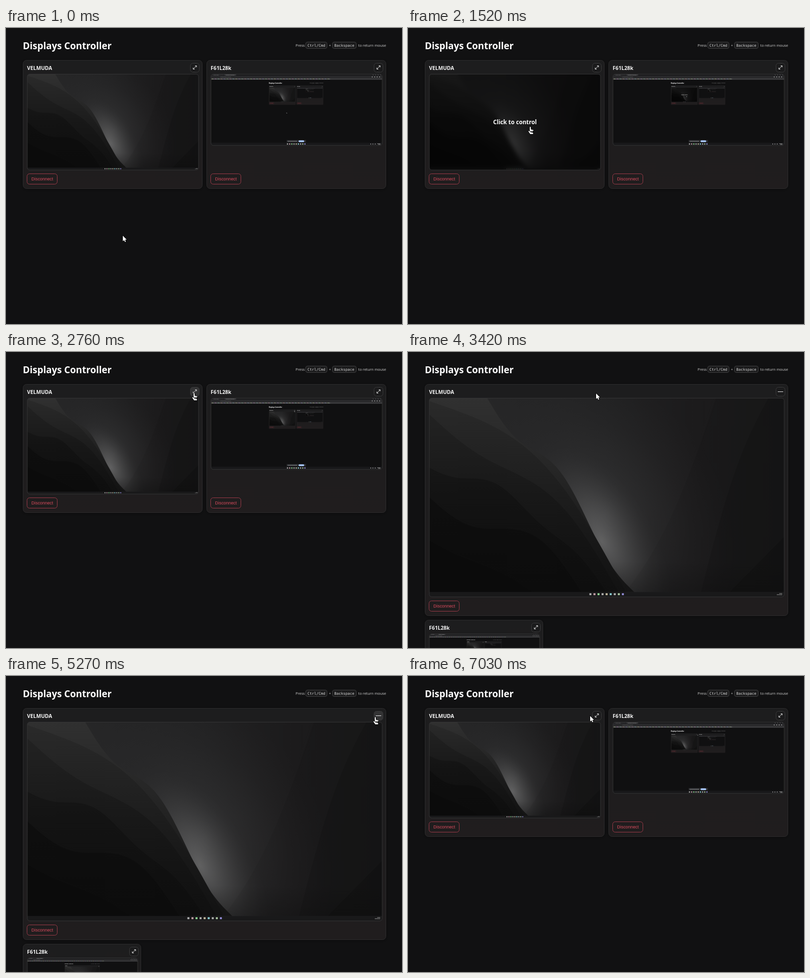
Write an HTML page with a canvas that moves like this. It is 800 px wide and 600 px high and loops after 7.06 s.

```html
<!DOCTYPE html>
<html lang="en">
<head>
<meta charset="utf-8">
<title>Displays Controller</title>
<style>
html, body { margin: 0; width: 100%; height: 100%; overflow: hidden; background: #111; }
canvas { display: block; width: 800px; height: 600px; }
</style>
</head>
<body>
<canvas id="stage" width="800" height="600"></canvas>
<script>
const LOOP = 7060, EXPAND = 3300, COLLAPSE = 5650, LAG = 150;
const SANS = '"Open Sans", "Noto Sans", sans-serif';
const MONO = '"DejaVu Sans Mono", monospace';
const BUTTON = '"Liberation Sans", Arial, sans-serif';
const stage = document.getElementById('stage').getContext('2d');
let c = stage;

const clamp = v => Math.max(0, Math.min(1, v));
const ramp = (t, a, b) => clamp((t - a) / (b - a));
const ease = u => u * u * (3 - 2 * u);
const gray = (v, a = 1) => `rgba(${v},${v},${v},${a})`;

function pointer(t) {
  const p = { x: 272, y: 431 };
  const move = (from, to, x, y) => {
    const u = ease(ramp(t, from, to));
    p.x += (x - p.x) * u;
    p.y += (y - p.y) * u;
  };
  move(-150, 0, 236, 421);
  move(700, 1450, 247, 201);
  move(1700, 2600, 380, 84);
  move(3930, 4900, 746, 84);
  move(6100, 7030, 368, 81);
  return p;
}

function rect(x, y, w, h, fill) {
  c.fillStyle = fill;
  c.fillRect(x, y, w, h);
}

function box(x, y, w, h, r, fill, line) {
  c.beginPath();
  c.roundRect(x + .5, y + .5, w - 1, h - 1, r);
  if (fill) { c.fillStyle = fill; c.fill(); }
  if (line) { c.strokeStyle = line; c.lineWidth = 1; c.stroke(); }
}

function text(s, x, y, font, color, align = 'left') {
  c.font = font;
  c.fillStyle = color;
  c.textAlign = align;
  c.fillText(s, x, y);
}

function gradient(x0, y0, x1, y1, ...colors) {
  const g = c.createLinearGradient(x0, y0, x1, y1);
  colors.forEach((k, i) => g.addColorStop(i / (colors.length - 1), k));
  return g;
}

// a line bent by one arch and one wave, filled down to the left or right side
function ridge(x0, y0, x1, y1, arch, wave, n, side, fill) {
  c.beginPath();
  for (let u = 0; u <= 1.001; u += .02) {
    const a = Math.PI * u;
    c.lineTo(x0 + (x1 - x0) * u, y0 + (y1 - y0) * u + arch * Math.sin(a) + wave * Math.sin(n * a));
  }
  c.lineTo(side, 487);
  c.lineTo(side, y0);
  c.fillStyle = fill;
  c.fill();
}

function glow(x, y, angle, rx, ry, strength) {
  c.save();
  c.translate(x, y);
  c.rotate(angle);
  c.scale(rx, ry);
  const g = c.createRadialGradient(0, 0, 0, 0, 0, 1);
  for (let r = 0; r <= 1; r += .125) g.addColorStop(r, gray(165, strength * (1 - r) ** 1.7));
  c.fillStyle = g;
  c.fillRect(-1, -1, 2, 2);
  c.restore();
}

function icons(x, y, step, size) {
  for (let i = 0; i < 9; i++) rect(x + i * step, y, size, size, `hsl(${205 + i * 140},${i % 3 * 22}%,68%)`);
}

// desktop picture, 717 by 403
function wallpaper() {
  c.save();
  c.translate(-43, -94);
  rect(43, 94, 717, 403, gradient(43, 0, 760, 0, '#2a2a2a', '#252526', '#212122', '#1c1b1c', '#181819'));
  glow(400, 330, 1, 330, 250, .15);
  glow(392, 385, 1.05, 215, 105, .42);
  ridge(622, 94, 440, 487, 45, 0, 1, 760, gray(0, .06));
  ridge(728, 94, 592, 487, -45, 0, 1, 760, gray(0, .12));
  ridge(760, 375, 650, 487, 0, 0, 1, 760, gray(0, .16));
  rect(43, 425, 717, 62, gradient(0, 425, 0, 487, gray(10, 0), gray(10, .25)));

  const tone = i => gradient(0, 94, 0, 487, gray(48 - 6 * i), gray(34 - 5 * i), gray(20 - 2 * i));
  ridge(160, 94, 457, 487, -26, 20, 3, 43, tone(0));
  ridge(43, 100, 440, 487, -96, 8, 2, 43, tone(1));
  ridge(43, 127, 425, 487, -52, 25, 2, 43, tone(2));
  ridge(43, 235, 400, 487, -58, 9, 4, 43, tone(3));
  ridge(43, 295, 350, 487, -32, 30, 2, 43, tone(4));
  ridge(43, 383, 250, 487, -4, 4, 2, 43, gray(11));

  rect(43, 487, 717, 10, '#19191a');
  icons(366.5, 489.5, 8.2, 4);
  rect(750, 489.5, 6, 1, '#888');
  rect(745, 492, 11, 1, '#999');
  c.restore();
}

const soft = document.createElement('canvas');
soft.width = 717;
soft.height = 403;
c = soft.getContext('2d');
wallpaper();
c = stage;

function desktop(w, h, veil) {
  c.save();
  c.scale(w / 717, h / 403);
  wallpaper();
  c.restore();
  if (!veil) return;
  c.save();
  c.globalAlpha = veil;
  c.filter = `blur(${4 * c.getTransform().a}px)`;
  c.drawImage(soft, 0, 0, w, h);
  c.filter = 'none';
  rect(0, 0, w, h, gray(0, .5));
  text('Click to control', w / 2, h / 2 + 4, `700 11.7px ${SANS}`, '#fff', 'center');
  c.restore();
}

// wide monitor with a browser showing this page, 346 by 144.5
function mirror(w, t, depth) {
  c.save();
  c.scale(w / 346, w / 346);
  rect(0, 0, 346, 145, '#101011');
  if (depth < 2) {
    c.save();
    c.beginPath();
    c.rect(0, 11, 346, 128);
    c.clip();
    c.translate(111.9, 13.25);
    c.scale(.15, .15);
    page(t - LAG, depth + 1);
    c.restore();
  }
  rect(0, 0, 346, 3, '#1b1b1d');
  rect(2, .6, 24, 2.4, '#29292b');
  rect(27, .6, 24, 2.4, '#39393b');
  rect(0, 3, 346, 5, '#29292b');
  rect(0, 8, 346, 3.4, '#3a3a3c');
  const tiny = `2px ${SANS}`;
  text('Home page', 5, 2.6, tiny, '#aaa');
  text('Displays Controller', 30, 2.6, tiny, '#ddd');
  text('localhost:3000/displays', 19, 6.6, tiny, '#aaa');
  for (let x = 2; x < 240; x += 6) {
    rect(x, 9, 1.3, 1.5, `hsl(${x * 37},30%,66%)`);
    rect(x + 2, 9.3, 2.6, .9, '#909092');
  }
  for (let i = 0; i < 4; i++) {
    rect(325 + i * 5, 5, 1.5, 1.5, '#bbb');
    rect(327 + i * 5, 1.2, 1.3, .7, '#999');
  }
  rect(153, 133.5, 39, 5, '#28292c');
  rect(155, 135.5, 19, 1, '#88898c');
  c.beginPath();
  c.roundRect(177, 134.2, 11.5, 3.6, 1.8);
  c.fillStyle = '#a8c7fa';
  c.fill();
  rect(0, 139, 346, 5.5, '#18181a');
  icons(153.5, 140.4, 4.4, 2.4);
  for (let i = 0; i < 3; i++) rect(322 + i * 4.5, 141, 1.6, 1.4, '#bbb');
  rect(336, 140.8, 6.5, .8, '#aaa');
  rect(338, 142.2, 4.5, .8, '#aaa');
  c.restore();
}

function sizeButton(x, y, minus, mouse) {
  const hot = mouse.x >= x && mouse.x < x + 19 && mouse.y >= y && mouse.y < y + 19;
  box(x, y, 19, 19, 5, hot ? '#333334' : '#1b1b1c', '#3a3a3b');
  c.save();
  c.translate(x + 9.5, y + 9);
  c.strokeStyle = '#e8e8e8';
  c.lineWidth = 1;
  c.beginPath();
  if (minus) {
    c.moveTo(-5.5, .5);
    c.lineTo(5.5, .5);
  } else {
    for (const s of [-1, 1]) {
      c.moveTo(0, 0);
      c.lineTo(3.4 * s, -3.4 * s);
      c.moveTo(.4 * s, -3.4 * s);
      c.lineTo(3.4 * s, -3.4 * s);
      c.lineTo(3.4 * s, -.4 * s);
    }
  }
  c.stroke();
  c.restore();
  return hot;
}

function card(x, y, w, h, name, view, depth, draw) {
  c.save();
  if (!depth) {
    c.shadowColor = gray(0, .45);
    c.shadowBlur = 7;
    c.shadowOffsetY = 1;
  }
  box(x, y, w, h, 7, gradient(0, y, 0, y + h, '#1d1d1e', '#1e1d1e', '#201d1e'));
  c.restore();
  box(x, y, w, h, 7, null, '#2d2c2d');
  text(name, x + 8.5, y + 19.8, `700 10.4px ${SANS}`, '#f4f4f4');

  const px = x + 9, py = y + 28.5;
  c.save();
  c.beginPath();
  c.roundRect(px, py, view.w, view.h, 5);
  c.clip();
  c.translate(px, py);
  draw();
  c.restore();
  box(px - .5, py - .5, view.w + 1, view.h + 1, 5, null, '#343435');

  const by = y + h - 31;
  box(x + 8, by, 62, 22, 5, null, '#9c3a48');
  text('Disconnect', x + 39.3, by + 14.3, `500 8.9px ${BUTTON}`, '#d94b5d', 'center');
}

function key(s, x, w) {
  box(x, 28, w, 14, 3.5, '#1b1b1c', '#414142');
  text(s, x + w / 2, 38, `7.45px ${MONO}`, '#d8d8d8', 'center');
}

function header() {
  text('Displays Controller', 34, 42.6, `700 18.95px ${SANS}`, '#fff');
  const small = `7.4px ${SANS}`;
  text('Press', 585, 38, small, '#d0d0d0');
  key('Ctrl/Cmd', 605, 44);
  text('+', 654.3, 38, small, '#d0d0d0', 'center');
  key('Backspace', 659, 49);
  text('to return mouse', 768, 38, small, '#d0d0d0', 'right');
}

function paint(path) {
  c.strokeStyle = '#000';
  c.lineWidth = 1.4;
  c.stroke(path);
  c.fillStyle = '#fff';
  c.fill(path);
}

const arrow = new Path2D('M0 0V11.2L2.6 8.9 4.4 12.8 6.2 12 4.5 8.2 7.8 8Z');
const hand = new Path2D();
hand.roundRect(-1, -.8, 2, 10, 1);
for (let i = 0; i < 3; i++) hand.roundRect(i * 1.9, 4.4 + i * .5, 2.6, 6, 1.2);
hand.addPath(new Path2D('M-1 8.5Q-3.6 6.4-3.8 8.4L0 14H5.4L6.4 10V7.5H-1Z'));

function page(t, depth) {
  const mouse = pointer(t);
  const veil = ramp(t, 1130, 1280) - ramp(t, 2435, 2570);
  const show = (x, y, w, h, vw, mirrored) => mirrored
    ? card(x, y, w, h, 'F61L28k', { w: vw, h: vw * .4176 }, depth, () => mirror(vw, t, depth))
    : card(x, y, w, h, 'VELMUDA', { w: vw, h: vw * .562 }, depth, () => desktop(vw, vw * .562, veil));
  let hot;
  header();
  if (t >= EXPAND && t < COLLAPSE) {
    show(34, 65, 734, 470, 717, false);
    show(34, 543, 239, 160, 223, true);
    hot = sizeButton(743, 71, true, mouse);
    sizeButton(249, 549, false, mouse);
  } else {
    show(34, 65, 363, 261, 346, false);
    show(405, 65, 363, 261, 346, true);
    const first = sizeButton(372, 71, false, mouse);
    const second = sizeButton(743, 71, false, mouse);
    const over = mouse.x > 43 && mouse.x < 389 && mouse.y > 94 && mouse.y < 288;
    hot = first || second || over;
  }
  c.save();
  c.translate(mouse.x, mouse.y);
  paint(hot ? hand : arrow);
  c.restore();
}

function frame(now) {
  rect(0, 0, 800, 600, '#111112');
  page((now - begin) % LOOP, 0);
  requestAnimationFrame(frame);
}

const begin = performance.now();
requestAnimationFrame(n => frame(Math.max(n, begin)));
</script>
</body>
</html>
```
